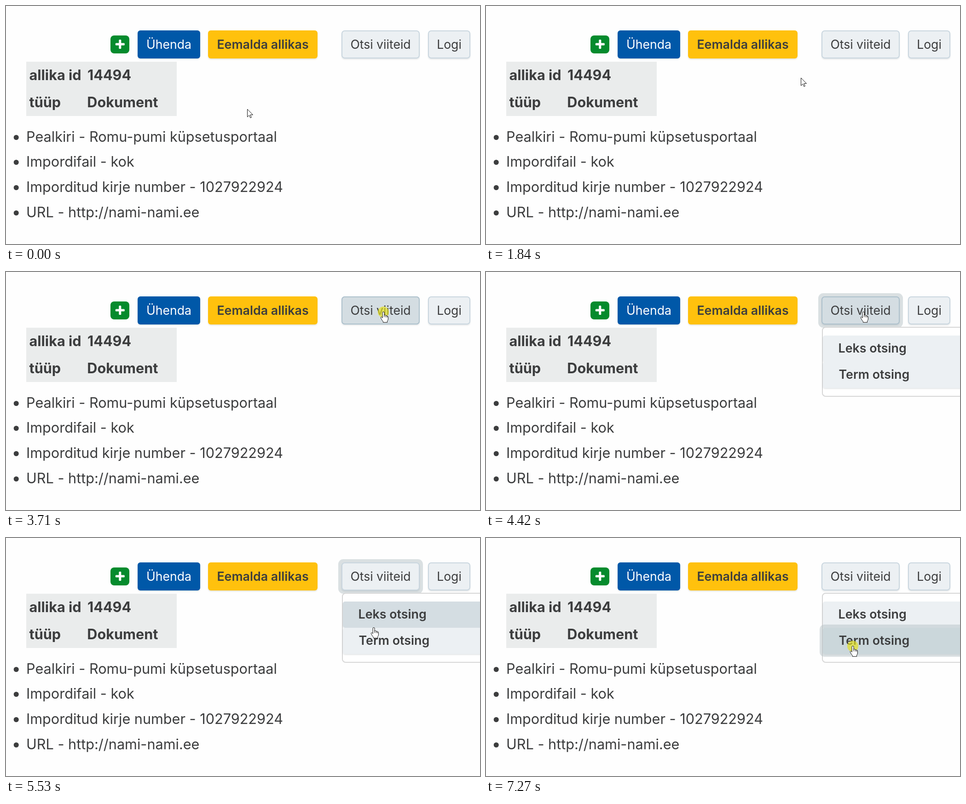
Write an HTML page that moves like this. It is 1030x517 px and loops after 8 s.

```html
<!DOCTYPE html>
<html lang="et">
<head>
<meta charset="utf-8">
<title>Allika vaade</title>
<style>
  html, body { margin: 0; width: 100%; height: 100%; overflow: hidden; background: #fefefe; }
  svg { display: block; width: 1030px; height: 517px; }
  text { font-family: Inter, Roboto, sans-serif; font-size: 30.62px; fill: #3c3d3e; white-space: pre; }
  .bold { font-weight: 700; }
  .btn text { font-size: 26.6px; text-anchor: middle; }
  .btn .strong, .item text { font-size: 26.8px; font-weight: 600; }
  .light { fill: #ecf0f3; stroke: #c9d6df; stroke-width: 2; }
  .dark { fill: #d4dde2; stroke: #adc1cc; stroke-width: 2; }
  .ring { fill: #b8c4c8; fill-opacity: .5; }
  .cursor { fill: #fff; stroke: #111; stroke-width: 1; stroke-linejoin: round; stroke-linecap: round; }
</style>
</head>
<body>
<svg viewBox="0 0 1030 517">
  <defs>
    <filter id="shade" x="-10%" y="-20%" width="120%" height="150%">
      <feDropShadow dx="0" dy="2" stdDeviation="1" flood-color="#405060" flood-opacity=".14"/>
    </filter>
  </defs>
  <rect width="1030" height="517" fill="#fefefe"/>

  <rect x="44" y="121" width="327" height="118" fill="#eaecec"/>
  <g class="bold">
    <text x="50.5" y="161">allika id</text><text x="177" y="161">14494</text>
    <text x="50.5" y="220">tüüp</text><text x="176.3" y="220">Dokument</text>
  </g>
  <g id="list"></g>

  <rect x="227" y="64" width="41" height="39" rx="8" fill="#058b2d"/>
  <g fill="#fff">
    <rect x="245.3" y="73" width="5" height="20" rx="1.5"/>
    <rect x="237.8" y="80.5" width="20" height="5" rx="1.5"/>
  </g>

  <g class="btn">
    <rect x="286" y="53" width="136" height="61" rx="6" fill="#0058a8" filter="url(#shade)"/>
    <text x="354" y="93" style="fill:#fff">Ühenda</text>
    <rect x="439" y="53" width="238" height="61" rx="6" fill="#ffc10a" filter="url(#shade)"/>
    <text class="strong" x="558" y="93">Eemalda allikas</text>
    <rect id="btnRing" class="ring" x="722" y="46" width="184" height="75" rx="11"/>
    <rect class="light" x="730" y="54" width="168" height="59" rx="6" filter="url(#shade)"/>
    <rect id="btnHover" class="dark" x="730" y="54" width="168" height="59" rx="6"/>
    <text x="814" y="93">Otsi viiteid</text>
    <rect class="light" x="918" y="54" width="90" height="59" rx="6" filter="url(#shade)"/>
    <text x="963" y="93">Logi</text>
  </g>

  <g id="menu" class="item">
    <rect x="731" y="120" width="340" height="150" rx="7" fill="#fff" stroke="#d6d6d6" stroke-width="2"/>
    <rect x="732" y="138" width="340" height="57" rx="5" fill="#ecf0f3" filter="url(#shade)"/>
    <rect x="732" y="195" width="340" height="57" rx="5" fill="#ecf0f3" filter="url(#shade)"/>
    <rect id="firstHover" x="732" y="138" width="340" height="57" rx="5" fill="#d4dde2"/>
    <rect id="itemRing" class="ring" x="725" y="188" width="350" height="70" rx="10"/>
    <rect id="lastHover" x="732" y="195" width="340" height="57" rx="5"/>
    <text x="765.5" y="175">Leks otsing</text>
    <text x="766.5" y="232">Term otsing</text>
  </g>

  <g id="pointer">
    <circle id="click" r="12" cy="1" fill="#e6e21e" fill-opacity=".68"/>
    <path id="arrow" class="cursor" d="M.5 .5V17L4.4 13.4L7 19L9.4 18L6.8 12.4H12Z"/>
    <g id="hand" class="cursor">
      <path d="M-2 2Q-2 .6 0 .6Q2 .6 2 2V7.6Q4.6 6.6 5.4 8.6Q7.6 7.6 8.3 9.8Q10.4 9.4 10.4 11.8V16Q10.4 18.6 8.6 20.4V23.4H-.6V21.4Q-3 19-4.2 16.2L-5.6 13.8Q-6 12-4.6 11.6Q-3.2 11.4-2 13.4Z"/>
      <path d="M2 7.6V11.6M5.4 8.6V12M8.3 9.8V12.4" fill="none"/>
    </g>
  </g>
</svg>
<script>
  const LOOP = 8000;
  const $ = id => document.getElementById(id);
  const clamp = v => Math.max(0, Math.min(1, v));
  const show = (id, on) => { $(id).style.display = on ? "" : "none"; };
  const fade = (t, from, to) => clamp((t - from) / 150) - clamp((t - to) / 150);

  const lines = [
    "Pealkiri - Romu-pumi küpsetusportaal",
    "Impordifail - kok",
    "Imporditud kirje number - 1027922924",
    "URL - http://nami-nami.ee"
  ];
  $("list").innerHTML = lines.map((line, i) => {
    const y = Math.floor(295 + i * 54.72);
    return `<circle cx="22.2" cy="${y - 9.5}" r="5.5" fill="#3c3d3e"/><text x="44" y="${y}">${line}</text>`;
  }).join("");

  // Each move: first and last step times, step count, points as [step, x, y].
  const moves = [
    [650, 1390, 12, [[-1, 524, 224], [4, 544, 216], [9, 582, 198], [11, 613, 187]]],
    [1460, 2210, 13, [[-1, 613, 187], [12, 744, 130]]],
    [2310, 2890, 10, [[-1, 744, 130], [3, 782, 110], [9, 819, 87]]],
    [3070, 3070, 1, [[-1, 819, 87], [0, 820, 86]]],
    [5070, 5870, 13, [[-1, 820, 86], [0, 817, 92], [7, 799, 194], [12, 798, 231]]],
    [5940, 6040, 2, [[-1, 798, 231], [1, 797, 234]]]
  ];

  function pointAt(points, step) {
    let i = 1;
    while (i < points.length - 1 && points[i][0] < step) i++;
    const [a, b] = [points[i - 1], points[i]];
    const u = clamp((step - a[0]) / (b[0] - a[0]));
    return [1, 2].map(n => Math.round(a[n] + (b[n] - a[n]) * u));
  }

  function cursorAt(t) {
    const move = moves.filter(m => t >= m[0]).pop();
    if (!move) return [524, 224];
    const [start, end, count, points] = move;
    const gap = (end - start) / (count - 1) || 1;
    // Steps are uneven; the offset lines them up with the held poses.
    const step = Math.min(count - 1, Math.floor((t - start) / gap + 0.3));
    return pointAt(points, step);
  }

  function draw(t) {
    const [x, y] = cursorAt(t);
    const open = t >= 4420;
    const firstClick = t >= 3710 && t < 3840;
    const lastClick = t >= 7270;
    const onButton = x >= 729 && y >= 53 && y < 114;
    const onItem = open && y >= 138;

    $("pointer").setAttribute("transform", `translate(${x} ${y})`);
    show("hand", onButton || onItem);
    show("arrow", !onButton && !onItem);
    show("click", firstClick || lastClick);
    show("menu", open);
    show("btnRing", t >= 3840 && !lastClick);
    show("itemRing", lastClick);
    $("btnHover").style.opacity = fade(t, 2490, 5184);
    $("firstHover").style.opacity = fade(t, 5317, 5584);
    $("lastHover").style.opacity = fade(t, 5584, LOOP + 1);
    $("lastHover").style.fill = lastClick ? "#cbd7db" : "#d4dde2";
  }

  const begin = performance.now();
  function tick() {
    draw((performance.now() - begin) % LOOP);
    requestAnimationFrame(tick);
  }
  draw(0);
  requestAnimationFrame(tick);
</script>
</body>
</html>
```
